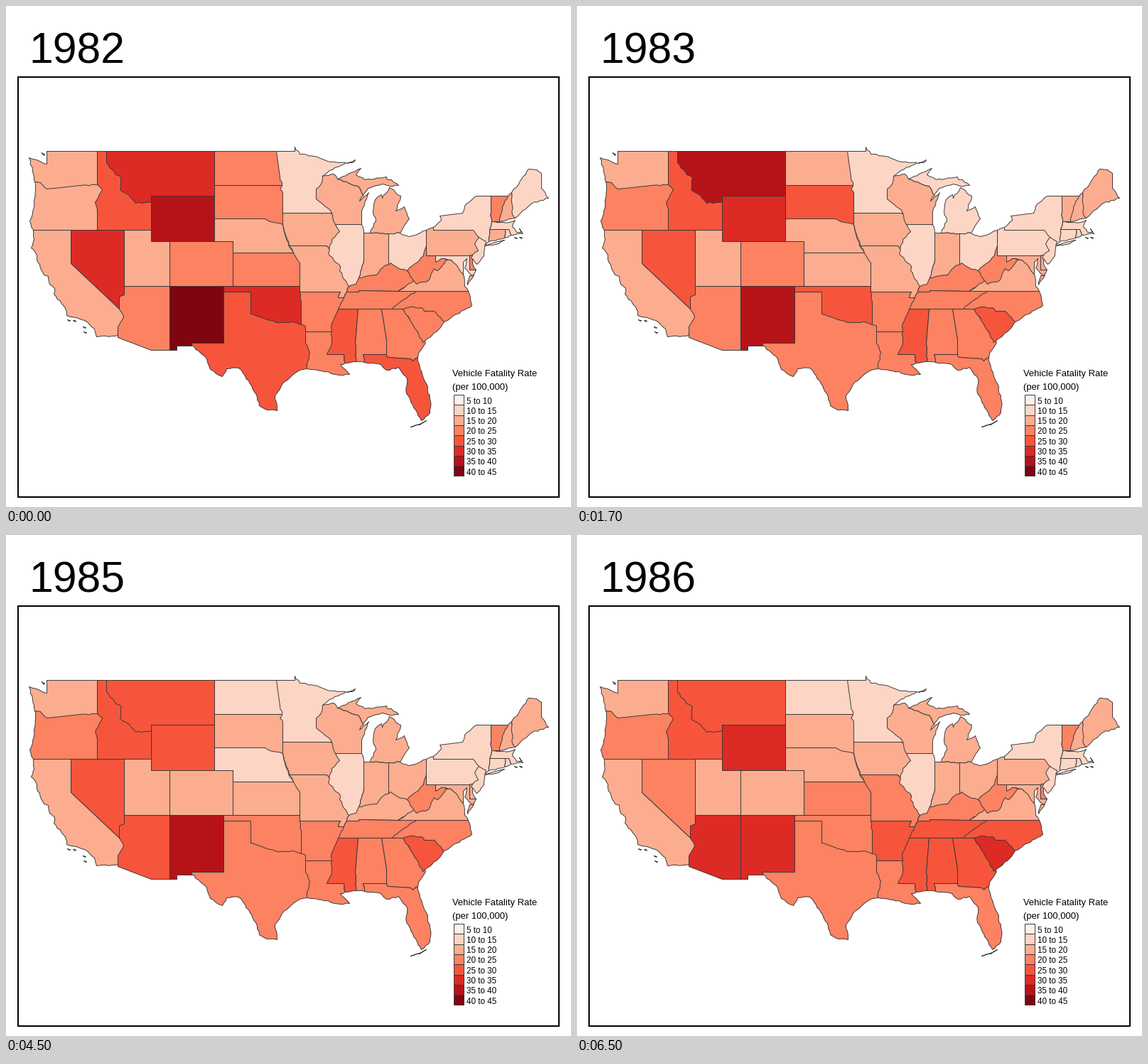
Recreate the animation shown at these times as a matplotlib script. Size 795 by 705 pixels, loop 8000 ms.

```python
import math
import random

import matplotlib.pyplot as plt
import numpy as np
from matplotlib.animation import FuncAnimation
from matplotlib.patches import Polygon, Rectangle

W, H, DPI = 795, 705, 100
PX = 72 / DPI
REDS = plt.get_cmap("Reds")(np.linspace(0.031, 0.95, 8))
BORDER = dict(edgecolor="#383838", linewidth=0.95 * PX, joinstyle="round")

plt.rcParams["font.family"] = "Liberation Sans"
fig = plt.figure(figsize=(W / DPI, H / DPI), dpi=DPI, facecolor="white")
ax = fig.add_axes([0, 0, 1, 1])
ax.set(xlim=(0, W), ylim=(H, 0))
ax.axis("off")

states = []


def snap(x, y):
    """Put a map point on a pixel centre so that straight borders are crisp."""
    return math.floor(x * 0.9976 + 0.3) + 0.5, math.floor(y) + 0.5


def wobble(a, b):
    """Inner points of a river or coast; equal for both neighbours."""
    p, q = sorted((a, b))
    dx, dy = q[0] - p[0], q[1] - p[1]
    size = math.hypot(dx, dy)
    if not (dx and dy) or not 4 < size < 32:
        return []
    rng = random.Random(int(p[0] * 7919 + p[1] * 104729 + q[0] * 31 + q[1] * 17))
    n = max(2, int(size / 4))
    pts = []
    for k in range(1, n):
        off = rng.uniform(-1, 1) / size
        pts.append((p[0] + dx * k / n - dy * off, p[1] + dy * k / n + dx * off))
    return pts if a == p else pts[::-1]


def state(levels, *xy):
    """Add an outline from its corners; levels holds one class digit per year."""
    corners = [snap(*p) for p in zip(xy[::2], xy[1::2])]
    path = []
    for a, b in zip(corners, corners[1:] + corners[:1]):
        path += [a, *wobble(a, b)]
    shape = Polygon(path, snap=False, **BORDER)
    ax.add_patch(shape)
    states.append((shape, [int(c) for c in levels]))


def box(levels, left, top, right, bottom):
    state(levels, left, top, right, top, right, bottom, left, bottom)


def islet(levels, x, y, w, h):
    state(levels, x - w, y - h, x + w, y, x + w / 2, y + h)


# Later outlines cover the loose inner edges of earlier ones.
# West
state("23333", 40, 247, 140, 251, 140, 315, 38, 315, 33, 302, 39, 283, 41, 253)
state("22222", 57, 204, 129, 204, 129, 251, 104, 252, 68, 256, 57, 257, 48, 248,
      40, 247, 37, 231, 32, 213, 47, 218, 57, 222)
islet("22222", 52, 208, 2, 2)
state("44344", 129, 204, 142, 204, 205, 260, 205, 315, 129, 315, 129, 286, 126, 276,
      136, 258, 129, 251)
state("56444", 142, 204, 294, 204, 294, 267, 205, 267, 205, 275, 183, 277, 174, 266,
      161, 258, 163, 241, 155, 237, 142, 220)
box("22222", 167, 315, 231, 394)
box("65545", 205, 267, 294, 331)
box("33222", 231, 331, 320, 394)
state("33445", 167, 394, 231, 394, 231, 484, 205, 484, 158, 466, 152, 420)
state("54443", 91, 315, 167, 315, 167, 406, 160, 409, 160, 426, 91, 362)
state("22222", 38, 315, 91, 315, 91, 362, 160, 426, 166, 437, 158, 451, 158, 463,
      128, 465, 124, 454, 110, 442, 101, 439, 85, 435, 83, 425, 67, 405, 68, 397,
      61, 391, 59, 380, 53, 378, 43, 356, 43, 350, 35, 340, 39, 328)
for x, y in (88, 442), (96, 443), (110, 452), (111, 459):
    islet("22222", x, y, 2, 1)
state("76565", 231, 394, 307, 394, 307, 474, 262, 474, 262, 478, 241, 478, 241, 484,
      231, 484)

# Plains and Midwest
box("32111", 294, 204, 395, 252)
box("34322", 294, 252, 395, 307)
state("11111", 381, 204, 407, 204, 407, 198, 414, 208, 434, 211, 453, 218, 479, 220,
      456, 231, 446, 239, 449, 250, 460, 291, 390, 291, 390, 262, 386, 257, 389, 252,
      386, 240)
state("22122", 390, 291, 457, 291, 475, 307, 475, 322, 455, 341, 451, 337, 399, 337,
      390, 307)
box("32323", 320, 347, 414, 394)
box("54333", 307, 394, 420, 452)
state("22223", 399, 337, 451, 337, 455, 341, 483, 380, 483, 394, 480, 402, 476, 410,
      468, 410, 471, 402, 414, 402, 414, 361, 405, 347)
state("22212", 294, 299, 365, 299, 372, 303, 390, 307, 398, 336, 405, 347, 320, 347,
      320, 331, 294, 331)
state("22222", 446, 239, 462, 236, 467, 243, 496, 253, 503, 266, 498, 274, 511, 262,
      501, 288, 501, 307, 464, 307, 456, 286, 437, 271, 437, 257, 444, 250)
state("21222", 467, 243, 486, 234, 500, 228, 493, 237, 506, 244, 536, 240, 538, 244,
      544, 244, 554, 252, 540, 253, 530, 250, 510, 256, 503, 266, 496, 253)
state("21222", 480, 221, 492, 216, 488, 220)
state("21222", 539, 320, 513, 319, 521, 302, 517, 289, 520, 272, 529, 265, 530, 270,
      540, 255, 557, 267, 550, 288, 562, 282, 569, 299, 560, 312, 556, 319)
state("11111", 464, 307, 501, 307, 504, 319, 504, 357, 497, 382, 495, 396, 483, 394,
      470, 372, 471, 366, 454, 348, 459, 328, 470, 317)
state("22222", 504, 319, 513, 319, 539, 320, 539, 364, 520, 386, 497, 382, 504, 357)
state("11222", 539, 320, 556, 319, 569, 324, 584, 319, 593, 315, 593, 345, 575, 372,
      560, 372, 539, 366)

# South
state("33334", 414, 402, 471, 402, 468, 410, 480, 410, 470, 458, 422, 458, 416, 452,
      416, 420)
state("33333", 420, 458, 465, 458, 476, 490, 478, 502, 471, 504, 484, 518, 470, 519,
      445, 513, 424, 510, 420, 480)
state("43333", 307, 402, 345, 402, 345, 433, 363, 439, 381, 445, 403, 444, 416, 448,
      422, 450, 422, 474, 428, 487, 424, 510, 412, 513, 389, 532, 379, 548, 382, 569,
      368, 568, 357, 562, 352, 545, 337, 520, 328, 509, 311, 510, 305, 521, 288, 511,
      283, 496, 262, 477, 262, 474, 307, 474)
state("44444", 468, 426, 496, 426, 492, 475, 493, 500, 478, 502, 476, 490, 452, 490,
      459, 474, 458, 450)
state("33334", 496, 426, 529, 426, 536, 469, 536, 490, 503, 490, 505, 501, 493, 500,
      492, 475)
state("33334", 529, 426, 560, 426, 592, 473, 582, 488, 581, 494, 574, 499, 571, 496,
      538, 494, 536, 490, 536, 469)
state("43433", 503, 490, 536, 490, 538, 494, 571, 496, 574, 499, 581, 494, 584, 510,
      593, 531, 599, 556, 598, 572, 586, 583, 574, 561, 565, 545, 566, 524, 554, 508,
      536, 512, 528, 504, 505, 501)
state("43433", 571, 592, 583, 588, 593, 583, 584, 589)
state("33323", 483, 394, 493, 391, 497, 382, 522, 378, 531, 367, 543, 361, 553, 368,
      566, 372, 580, 386, 553, 401, 497, 400, 497, 402, 480, 402)
state("22222", 553, 401, 575, 386, 600, 365, 620, 352, 638, 366, 646, 380, 647, 394,
      652, 401)
state("22222", 660, 378, 651, 392, 654, 379)
state("33334", 480, 402, 497, 402, 497, 400, 553, 401, 580, 401, 570, 420, 545, 426,
      468, 426, 476, 410)
state("33334", 652, 401, 579, 401, 555, 417, 545, 426, 560, 426, 618, 444, 628, 438,
      650, 425, 657, 421)
state("34445", 560, 426, 570, 423, 586, 424, 590, 429, 604, 429, 618, 444, 607, 458,
      588, 473, 575, 450)
state("33333", 566, 372, 577, 362, 589, 351, 593, 337, 593, 351, 606, 351, 628, 357,
      621, 357, 609, 372, 604, 369, 596, 386, 579, 391, 575, 386)

# Northeast
state("12122", 606, 351, 654, 351, 654, 371, 663, 371, 658, 379, 647, 368, 650, 355,
      645, 360, 645, 377, 637, 366, 628, 357, 614, 355, 606, 360)
state("11111", 603, 315, 603, 311, 614, 301, 612, 295, 644, 291, 647, 281, 660, 269,
      667, 267, 684, 267, 684, 290, 685, 303, 682, 314, 681, 331, 677, 335, 660, 330)
state("11111", 676, 337, 694, 331, 703, 329, 695, 334)
state("21112", 593, 315, 603, 311, 603, 315, 659, 315, 667, 325, 670, 340, 658, 350,
      653, 351, 593, 351)
state("32323", 654, 351, 658, 350, 658, 362, 663, 371, 654, 371)
state("11111", 667, 325, 677, 331, 675, 341, 674, 351, 664, 363, 656, 354, 658, 350,
      666, 344, 661, 334)
state("32333", 684, 267, 708, 267, 705, 290, 696, 303, 685, 303, 684, 290)
state("22222", 708, 267, 713, 262, 720, 290, 718, 298, 696, 303, 700, 282)
state("12322", 713, 262, 723, 250, 737, 229, 748, 230, 755, 235, 755, 256, 765, 270,
      742, 277, 729, 287, 718, 298, 714, 293)
state("11111", 685, 303, 710, 304, 718, 301, 714, 310, 720, 318, 727, 318, 724, 313,
      729, 320, 712, 322, 709, 314, 682, 314)
state("21111", 682, 314, 704, 314, 703, 326, 681, 331)
state("11011", 704, 314, 709, 314, 712, 322, 703, 326)
for x in 719, 726:
    islet("11111", x, 326, 2, 1)

# Frame, legend and title
ax.add_patch(Rectangle((17, 100), 761, 591, fill=False, edgecolor="black",
                       linewidth=2 * PX))


def label(x, y, text, size):
    return ax.text(x, y, text, fontsize=size * PX, color="black", va="baseline")


label(628, 521, "Vehicle Fatality Rate", 13)
label(628, 540, "(per 100,000)", 13)
for i, red in enumerate(REDS):
    top = 547 + 14.3 * i
    ax.add_patch(Rectangle((630, top), 14, 14.3, facecolor=red, **BORDER))
    label(648, top + 12.6, f"{5 * i + 5} to {5 * i + 10}", 11.6)
title = label(32.2, 80.2, "1982", 60.6)


def draw(i):
    year = (i + 3) // 4
    title.set_text(str(1982 + year))
    for shape, levels in states:
        shape.set_facecolor(REDS[levels[year]])
    return []


anim = FuncAnimation(fig, draw, frames=16, interval=500, repeat=True,
                     repeat_delay=0, blit=False)
plt.show()
```
